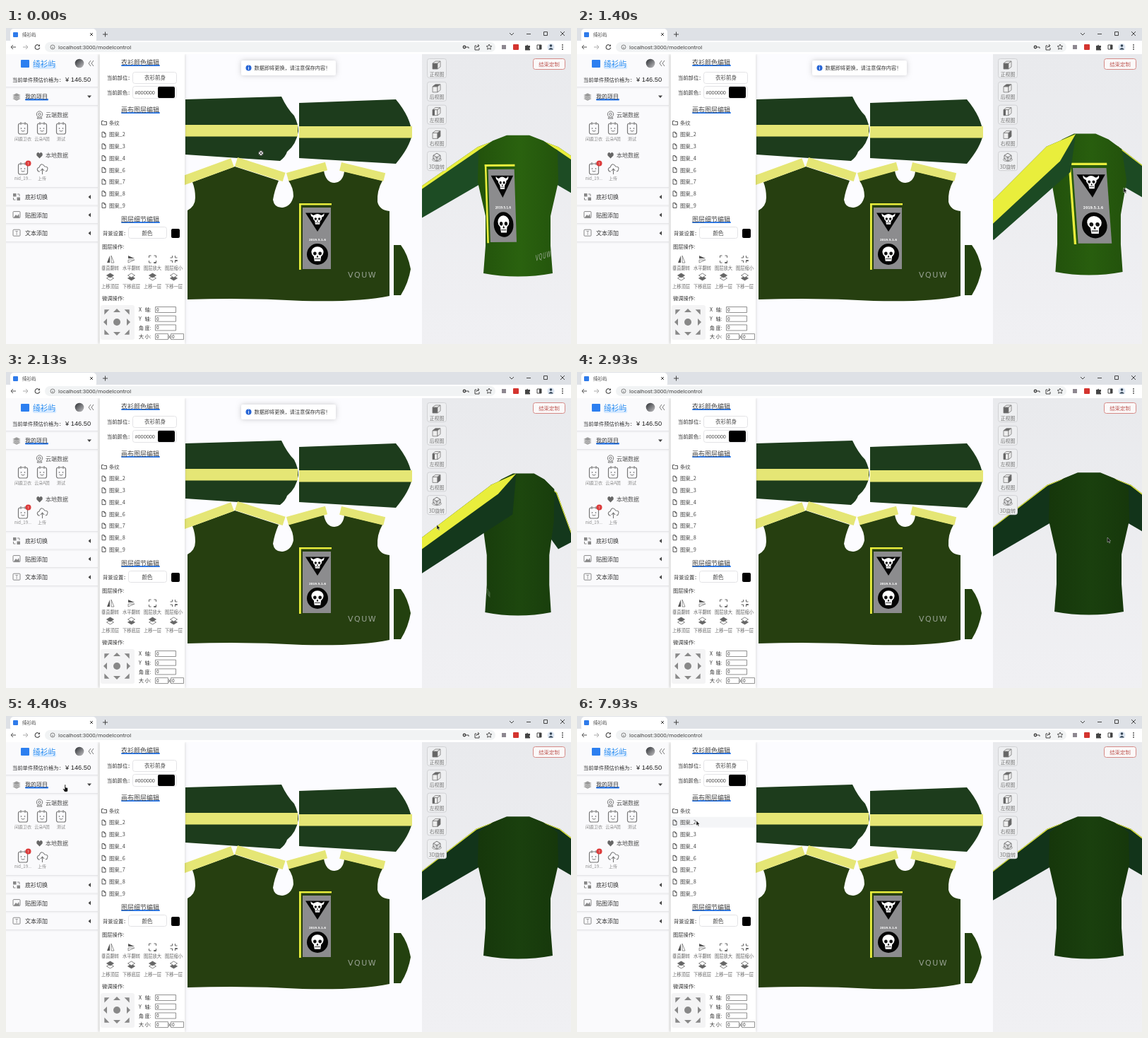
Recreate the animation shown at these times as an HTML page with a canvas. Size 800 by 447 pixels, loop 8 s.

```html
<!DOCTYPE html>
<html lang="zh">
<head>
<meta charset="utf-8">
<style>
html, body { margin: 0; width: 100%; height: 100%; overflow: hidden; }
canvas { display: block; width: 800px; height: 447px; }
</style>
</head>
<body>
<canvas id="stage"></canvas>
<script>
const canvas = document.getElementById('stage');
const dpr = window.devicePixelRatio || 1;
canvas.width = 800 * dpr;
canvas.height = 447 * dpr;
const c = canvas.getContext('2d');
const CJK = '"Noto Sans CJK SC", "Noto Sans CJK JP", sans-serif';
const WIDE = '"DejaVu Sans", sans-serif';
const YELLOW = '#e5e675', LIME = '#e9ee3c', GREY = '#777', BLUE = '#2f7bea';
const BRAND = '绮衫屿', CHEST = 'VQUW';

// Drawing helpers
function paint(fill, stroke, width = 1) {
  if (fill) { c.fillStyle = fill; c.fill(); }
  if (stroke) { c.strokeStyle = stroke; c.lineWidth = width; c.stroke(); }
}
function box(x, y, w, h, fill, stroke, r = 0, width = 1) {
  c.beginPath(); c.roundRect(x, y, w, h, r); paint(fill, stroke, width);
}
function disc(x, y, r, fill, stroke, width = 1, ry = r) {
  c.beginPath(); c.ellipse(x, y, r, ry, 0, 0, 7); paint(fill, stroke, width);
}
function poly(points, fill, stroke, width) {
  c.beginPath();
  for (const p of points) c.lineTo(...p);
  c.closePath();
  paint(fill, stroke, width);
}
function shape(d, fill, stroke, width = 1) {
  const p = new Path2D(d);
  if (fill) { c.fillStyle = fill; c.fill(p); }
  if (stroke) { c.strokeStyle = stroke; c.lineWidth = width; c.stroke(p); }
}
function text(s, x, y, size = 7.5, color = '#333', align = 'left', font = CJK, weight = 400) {
  c.font = `${weight} ${size}px ${font}`;
  c.fillStyle = color; c.textAlign = align; c.textBaseline = 'middle';
  c.fillText(s, x, y);
}
function at(x, y, draw, angle = 0) { c.save(); c.translate(x, y); c.rotate(angle); draw(); c.restore(); }
function shadowed(blur, draw) {
  c.save(); c.shadowColor = 'rgba(0,0,0,.2)'; c.shadowBlur = blur * dpr; draw(); c.restore();
}

const mix = (a, b, u) => a.map((v, i) => v + (b[i] - v) * u);
const rgb = (color, k = 1) => `rgb(${color.map(v => Math.round(v * k))})`;

// Value of [time, ...numbers] keys at time t, eased between keys
function track(keys, t) {
  const n = keys.findIndex(k => k[0] > t);
  if (n < 0) return keys.at(-1).slice(1);
  const [a, b] = [keys[n - 1], keys[n]];
  const u = (t - a[0]) / (b[0] - a[0]);
  return mix(a, b, u * u * (3 - 2 * u)).slice(1);
}

function browser() {
  box(0, 0, 800, 18, '#dee1e6');
  box(6, 1, 122, 20, '#fff', null, 5);
  box(0, 18, 800, 19, '#fff');
  box(10, 6, 7, 7, BLUE, null, 1);
  text(BRAND, 23, 9.5, 6.5, '#444');
  shape('M119 7l4 4m0-4l-4 4M137 9h7m-3.5-3.5v7M713 7l3 3 3-3M737 8.5h6M761.5 5.5h5v5h-5zM785 5l6 6m0-6l-6 6', null, '#444');
  shape('M14 27h-7l3-3m-3 3l3 3', null, '#555');
  shape('M24 27h7l-3-3m3 3l-3 3', null, '#aaa');
  c.beginPath(); c.arc(44.5, 27, 3.3, .2, 5.5); paint(null, '#555', 1.2);
  shape('M45 26h3v-3z', '#555');
  box(55, 20, 638, 14, '#f1f3f4', null, 7);
  disc(66, 27, 3, null, '#666', .8); shape('M66 26.5v2.5', null, '#666', .8);
  text('localhost:3000/modelcontrol', 74, 27.5, 8, '#444', 'left', 'Roboto, sans-serif');
  disc(649, 27, 1.7, null, '#444', 1.4);
  shape('M651 27h4v2M666 25h-2v6h6v-3M666 28q0-3 4-3m-2-2 2 2-2 2', null, '#444');
  poly(Array.from({ length: 10 }, (_, i) => {
    const r = i % 2 ? 1.9 : 4, a = i * Math.PI / 5;
    return [684 + r * Math.sin(a), 27 - r * Math.cos(a)];
  }), null, '#444', .9);
  box(702, 24, 6, 6, '#8d8790');
  box(718, 23, 8, 8, '#d4342f', null, 1);
  shape('M735 25h2q1-3 2 0h3v2.5q-2 1 0 2v2h-7z', '#444');
  box(752, 24, 6, 6, null, '#444'); box(755, 24, 3, 6, '#444');
  disc(771.5, 27, 5, '#dde6f2'); disc(771.5, 25, 1.8, '#345');
  shape('M768 30.5q3.5-5 7 0z', '#345');
  for (const y of [24, 27, 30]) disc(788, y, .9, '#444');
}

function projectIcon(x, y) {
  at(x, y, () => {
    box(-6.5, -7, 13, 15, null, GREY, 2.5, 1.2);
    shape('M-3-9v4M3-9v4M-2.5 3q2.5 2.500 5 0', null, GREY);
    disc(-2.5, 0, .8, '#555'); disc(2.5, 0, .8, '#555');
  });
}

function sidebar() {
  shadowed(4, () => box(0, 37, 130, 410, '#fafafc'));
  box(21, 45, 12, 11, '#2c7ff0', null, 1);
  box(38, 52, 33, 6, '#d5e9ff', null, 2);
  text(BRAND, 38, 51, 10.8, '#258af1', 'left', CJK, 500);
  const g = c.createLinearGradient(98, 44, 110, 56);
  g.addColorStop(0, '#2d3034'); g.addColorStop(1, '#c0bfc2');
  disc(104, 50, 6.3, g);
  shape('M120 46l-3 4 3 4m4-8l-3 4 3 4', null, GREY);
  text('当前单件预估价格为：', 9, 73.5, 7.3);
  text('¥ 146.50', 84, 73, 9.3, '#222', 'left', '"Liberation Sans", sans-serif');
  for (const y of [84, 110, 226, 251.5, 277, 303]) {
    box(0, y - 1, 130, 1, '#e5e5e8'); box(0, y, 130, 1.5, '#f2f2f4');
  }
  box(27, 100, 33, 2.6, BLUE, null, 1);
  text('我的项目', 27, 97, 8, '#333', 'left', CJK, 500);
  for (const y of [100, 97.5, 95]) shape(`M9 ${y}l6-3 6 3-6 3z`, '#999', '#fff', .5);
  shape('M115 95.5h6l-3 3.5z', '#444');
  disc(47.5, 122, 4.2, null, GREY); disc(47.5, 122, 1.7, null, GREY);
  shape('M46 125l-2 3h7l-2-3', null, GREY);
  text('云端数据', 56, 123, 8, '#555');
  ['间鹿卫衣', '云朵A团', '测试'].forEach((s, i) => {
    projectIcon(24 + i * 27, 142);
    text(s, 24 + i * 27, 156.5, 6, '#888', 'center');
  });
  shape('M47.5 184.5l-4-4q-1-4 2-4.5q1.5 0 2 1.8q.5-1.800 2-1.800q3 .5 2 4.5z', '#666');
  text('本地数据', 56, 180, 8, '#555');
  projectIcon(24, 199);
  disc(31.5, 191.5, 4, '#dc3b3b'); text('?', 31.5, 192, 5, '#fff', 'center');
  shape('M48 203h-2q-4-4 1-6q3-8 8-1q6 0 3 6l-2 1M51.500 207v-8m-2.5 3 2.5-3 2.5 3', null, GREY, 1.1);
  text('nid_19...', 24, 213, 6, '#888', 'center');
  text('上传', 51, 213, 6, '#888', 'center');
  ['底衫切换', '贴图添加', '文本添加'].forEach((s, i) => {
    const y = 239 + i * 25.6;
    text(s, 27, y, 8, '#333', 'left', CJK, 500);
    shape(`M120 ${y - 3}v6l-3.5-3z`, '#444');
    if (i) box(10, y - 5, 10, 9, null, '#888', 1);
  });
  box(10, 234, 4.5, 4.5, '#888'); box(15.5, 239.5, 4.5, 4.5, '#888');
  shape('M16 235h3v3M10.500 240v3h3', null, '#888');
  shape('M11 268l3-4 2 2 2-3 1 5z', '#888');
  text('T', 15, 290, 7, GREY, 'center');
}

function heading(s, y) {
  box(163, y + 3.4, 55, 2.2, BLUE, null, 1);
  text(s, 190, y, 9, '#444', 'center', CJK, 500);
}
const field = (x, y, w, h) => box(x, y, w, h, '#fff', '#e3e3e6', 3);

function toolIcons() {
  shape('M147 322v10h-4zM173 322v4h9z', '#555');
  shape('M149 322v10h4zM173 332v-4h9z', null, GREY, .8);
  for (let i = 0; i < 4; i++) at(207.5, 327, () => {
    shape('M2 5h3v-3M32 5v-3h3', null, '#666');
    c.translate(0, 0);
  });
  for (const sx of [-1, 1]) for (const sy of [-1, 1]) {
    shape(`M${207.5 + sx * 2} ${327 + sy * 5}h${sx * 3}v${-sy * 3}`, null, '#666');
    shape(`M${237.5 + sx * 2} ${327 + sy * 5}v${-sy * 3}h${sx * 3}`, null, '#666');
  }
  for (let i = 0; i < 4; i++) for (const d of [2, -2]) {
    shape(`M${142.5 + i * 30} ${352 + d}l5-3 5 3-5 3z`, (d > 0) === (i % 2 > 0) ? '#666' : '#fff', '#666', .8);
  }
}

function editor(mouse) {
  shadowed(4, () => box(133, 37, 120, 410, '#fff'));
  heading('衣衫颜色编辑', 48.5);
  text('当前部位：', 143, 70.5, 7.3);
  field(179.5, 62.5, 62, 16);
  text('衣衫前身', 211, 70.5, 7.5, '#444', 'center');
  text('当前颜色：', 143, 91.5, 7.3);
  field(179.5, 82.5, 62, 17);
  text('#000000', 182.5, 91.5, 7.3, '#444', 'left', '"Liberation Sans", sans-serif');
  box(215, 83, 24, 16, '#000', null, 2);
  heading('画布图层编辑', 115.5);
  ['条纹', ...[2, 3, 4, 6, 7, 8, 9].map(n => '图案_' + n)].forEach((s, i) => {
    const y = 134 + i * 16.7;
    if (mouse[0] > 134 && mouse[0] < 253 && Math.abs(mouse[1] - y) < 8) box(134, y - 8, 119, 15, '#f4f5f7');
    text(s, 146, y, 7.3, '#444');
    shape(i ? `M136 ${y - 3.5}h3l2 2v5h-5zm3 0v2h2` : `M135.5 ${y - 2.5}h2.5l1 1h3.5v4.5h-7z`, null, '#444', .9);
  });
  heading('图层细节编辑', 270.5);
  text('背景设置：', 137, 290.5, 7.3);
  field(173.5, 281.5, 54, 16);
  text('颜色', 200, 290, 7.5, '#444', 'center');
  box(234, 284, 12, 13, '#000', null, 2);
  text('图层操作:', 136, 309.5, 7.3);
  ['垂直翻转', '水平翻转', '图层放大', '图层缩小', '上移顶层', '下移底层', '上移一层', '下移一层']
    .forEach((s, i) => text(s, 147.5 + i % 4 * 30, i < 4 ? 340 : 366, 6.3, '#666', 'center'));
  toolIcons();
  text('微调操作:', 136, 382, 7.3);
  box(134, 392, 48, 49, '#f4f4f5', null, 3);
  disc(157, 416, 5, '#888');
  for (let i = 0; i < 8; i++) {
    at(157, 416, () => shape(`M-5 ${i % 2 ? -20 : -14}h10l-5-5z`, '#888'), i * Math.PI / 4);
  }
  const input = (x, y, w) => { box(x, y - 4, w, 8, '#fff', GREY, 0, .8); text('0', x + 1.5, y, 6.5); };
  ['X   轴:', 'Y   轴:', '角 度:', '大 小:'].forEach((s, i) => {
    const y = 398.5 + i * 12.7;
    text(s, 188, y, 7);
    input(211.5, y, i < 3 ? 29 : 18);
  });
  text('x', 230, 437, 6);
  input(233.5, 436.6, 18);
}

function skull(x, y, s, horns) {
  at(x, y, () => {
    c.scale(s, s);
    if (horns) shape('M-5-2Q-14-4-12-10Q-9-5-4-7L4-7Q9-5 12-10Q14-4 5-2z', '#fff');
    disc(0, -2, 8, '#fff', null, 1, 7);
    shape('M-5 2h10l-1 8h-8z', '#fff');
    disc(-3.4, 0, 2.2, '#111'); disc(3.4, 0, 2.2, '#111');
    shape('M0 2l-1.4 3h2.800z', '#111');
    shape('M-3.5 7h7', null, '#111', .8);
  });
}

// Chest print, 46 by 94, from its top left corner
function emblem() {
  box(0, 0, 46, 2.6, LIME); box(0, 0, 2.8, 94, LIME);
  box(5, 6, 40, 87, '#8c8c8e');
  shape('M9 13.5h34l-17 26.500z', '#050505');
  skull(26, 22, .78, true);
  text('2019.5.1.6', 26, 52, 4, '#fff', 'center', WIDE, 700);
  disc(26, 72, 15, '#050505');
  skull(26, 71, 1.08);
}

function chestName(color) {
  c.letterSpacing = '1.5px';
  text(CHEST, 0, 0, 11, color, 'left', WIDE);
  c.letterSpacing = '0px';
}

function pattern() {
  box(254, 37, 335, 410, '#fcfcff');
  const strip = (x, y, w, h, slope = 0) => at(x, y, () => box(0, 0, w, h, YELLOW), slope);
  shape('M254 101L390 97Q398 114 408 124Q414 136 414 146Q411 165 398 175Q396 182 388 188L254 179z', '#1d3c1c');
  shape('M415 106L552 101Q573 126 575 150Q572 168 552 192L415 184z', '#1d3c1c');
  strip(254, 137, 159, 16.5); strip(415, 139, 160, 16.5);
  shape('M257 384V258Q268 252 268 240Q268 228 264 218L324 196L386 216Q380 230 378 243Q380 255 392 254Q404 252 407 238Q407 226 400 216L450 202Q453 219 465 219Q477 218 479 203L533 216Q525 230 526 246Q529 258 543 259V379Q500 388 420 386Q340 381 257 384z', '#263f10');
  strip(248, 210, 75, 13, -.35); strip(328, 183, 71, 13, .31);
  strip(397, 205, 57, 12, -.27); strip(475, 190, 64, 12, .24);
  shape('M549 307H559Q569 320 573 341Q570 360 559 378H549z', '#23410f');
  at(415, 248, emblem);
  at(484, 350, () => chestName('#98a293'));
}

// Shirt model: x to the side, y down, z to the wearer's front.
// Torso rings: height, half width, half depth
const TORSO = [[143, 16, 14], [151, 36, 26], [165, 56, 38], [210, 57, 46], [258, 46, 43], [300, 46, 43], [339, 49, 45]];
const CAMERA = 600, AXIS = 725, EYE = 245, LEAN = -10;

function project(x, y, z, { cos, sin, lift }) {
  const depth = z * cos - x * sin, scale = CAMERA / (CAMERA - depth);
  return { x: AXIS + (x * cos + z * sin) * scale, y: EYE + (y - EYE) * scale + depth * .1 + lift, depth, scale };
}

function sleeve(side, view, cloth) {
  const neck = project(side * 16, 144, LEAN, view);
  const shoulder = project(side * 45, 180, LEAN, view);
  const cuff = project(side * 170, 262, 30, view);
  const dx = cuff.x - shoulder.x, dy = cuff.y - shoulder.y, len = Math.hypot(dx, dy), up = dx > 0 ? 1 : -1;
  const facing = (cuff.depth - shoulder.depth) / 155;
  // A point across the tube: 1 is its upper edge, -1 its lower edge
  const across = (p, r, k) => [p.x + up * dy / len * r * k * p.scale, p.y - up * dx / len * r * k * p.scale];
  const top = [[neck.x, neck.y], across(shoulder, 24, 1), across(cuff, 16, 1)];
  const edge = 1 - 2 * (.03 + 1.1 * Math.max(0, facing - .2));
  return {
    front: facing > .3,
    draw() {
      poly([...top, across(cuff, 16, -1), across(shoulder, 24, -1)], cloth);
      poly([...top, across(cuff, 16, edge), across(shoulder, 24, edge)], LIME);
    },
  };
}

function torsoPath(view) {
  const ring = ([y, a, b]) => {
    const lean = LEAN * Math.max(0, (210 - y) / 67), p = project(0, y, lean, view);
    return [p.x, p.y, Math.hypot(a * view.cos, b * view.sin)];
  };
  const rings = TORSO.map(ring), hem = rings.at(-1);
  c.beginPath();
  for (const [x, y, w] of rings) c.lineTo(x + w, y);
  c.quadraticCurveTo(hem[0], hem[1] + 9, hem[0] - hem[2], hem[1]);
  for (const [x, y, w] of rings.reverse()) c.lineTo(x - w, y);
  c.closePath();
}

// Lays a flat print w by h on the torso between two angles, in degrees from the front
function wrap(from, to, skew, top, bottom, w, h, view, draw) {
  const on = (deg, y) => {
    const a = deg * Math.PI / 180;
    return project(49 * Math.sin(a), y, 45 * Math.cos(a), view);
  };
  const p = on(from, top), q = on(to, top), r = on(from + skew, bottom);
  if (q.x <= p.x) return;
  c.save();
  c.transform((q.x - p.x) / w, (q.y - p.y) / w, (r.x - p.x) / h, (r.y - p.y) / h, p.x, p.y);
  draw();
  c.restore();
}

function shirt(degrees, lift) {
  const a = degrees * Math.PI / 180;
  const view = { cos: Math.cos(a), sin: Math.sin(a), lift };
  const light = .5 + .5 * view.cos;
  const cloth = mix([25, 62, 13], [40, 94, 14], light);
  const sleeves = [-1, 1].map(side => sleeve(side, view, rgb(mix([18, 52, 26], [29, 76, 36], light))));
  sleeves.filter(s => !s.front).forEach(s => s.draw());
  const g = c.createLinearGradient(670, 0, 785, 0);
  [.88, 1.04, .88].forEach((k, i) => g.addColorStop(i / 2, rgb(cloth, k)));
  c.save();
  torsoPath(view);
  paint(g); c.clip();
  wrap(-70, -5, 11, 185, 292, 46, 94, view, emblem);
  wrap(28, 80, 0, 310, 320, 44, 10, view, () => chestName('#9dac97'));
  c.restore();
  sleeves.filter(s => s.front).forEach(s => s.draw());
}

function cube(x, y, side) {
  const tone = n => n === side ? '#666' : '#eee';
  shape(`M${x - 5} ${y - 3}h7v8h-7z`, tone(0), GREY, .8);
  shape(`M${x - 5} ${y - 3}l4-3h7l-4 3z`, tone(1), GREY, .8);
  shape(`M${x + 2} ${y - 3}l4-3v8l-4 3z`, tone(3), GREY, .8);
  if (side === 2) box(x - 5, y - 3, 3, 8, '#666');
}

function viewer(t) {
  const g = c.createLinearGradient(0, 37, 0, 447);
  g.addColorStop(0, '#e9eaed'); g.addColorStop(1, '#f0f0f3');
  c.save();
  c.beginPath(); c.rect(589, 37, 211, 410); c.clip();
  box(589, 37, 211, 410, g);
  shirt(...track(TURN, t));
  c.restore();
  ['正视图', '后视图', '左视图', '右视图', '3D旋转'].forEach((s, i) => {
    const y = 57 + i * 32.8;
    box(596.5, y - 13.5, 27, 27, '#eeeff1', '#d0d1d4', 3);
    if (i < 4) cube(609, y - 4, i);
    else {
      shape(`M610 ${y - 11}l5 3v5l-5 3-5-3v-5zm-5 3l5 2.5 5-2.5m-5 2.5v5.5`, null, GREY);
      disc(610, y - 2, 6.5, null, '#888', .8, 2.5);
    }
    text(s, 610, y + 8, 6.9, GREY, 'center');
  });
  box(746.5, 43.5, 45, 15, '#fbf9f9', '#d58a87', 3);
  text('结束定制', 769, 51.5, 7.4, '#bf5a56', 'center');
}

function toast(t) {
  const gone = Math.min(1, Math.max(0, (t - 2350) / 250));
  if (gone === 1) return;
  at(0, -20 * gone, () => {
    c.globalAlpha = 1 - gone;
    shadowed(7, () => box(333, 46, 134, 21, '#fff', null, 2));
    disc(343.5, 56.5, 4, '#2765d5');
    text('i', 343.5, 56.5, 6, '#fff', 'center', CJK, 700);
    text('数据即将更换，请注意保存内容！', 351.5, 56.5, 7.2);
  });
}

function pointer([x, y]) {
  at(x, y, () => {
    if (x > 254 && x < 588) {
      disc(0, 0, 3.2, '#fff', '#555', .8);
      shape('M-3-3l6 6m0-6l-6 6', null, '#444');
    } else if (x < 130) {
      shape('M-1-5h1.5v4l3 .8v4l-1 1.5h-3.5l-2.5-4 1-.5 1.5 1z', '#111', '#fff', .5);
    } else {
      shape('M0-3v7l1.6-1.4 1.2 2.4 1-.5-1.100-2.3 1.9-.2z', '#111', '#fff', .4);
    }
  });
}

// Time, heading in degrees, vertical offset
const TURN = [[0, 0, 8], [800, 0, 8], [1380, 37, 6], [1440, 37, 6], [2150, -130, 1], [2350, -130, 1], [2930, -180, 0]];
const MOUSE = [[0, 361, 177], [700, 732, 226], [1400, 774, 229], [1440, 774, 229], [2130, 610, 219],
  [2480, 793, 238], [2930, 751, 237], [3470, 751, 237], [4300, 84, 102], [7370, 84, 102], [7930, 169, 151]];

function draw(now) {
  const t = now % 8000, mouse = track(MOUSE, t);
  c.setTransform(dpr, 0, 0, dpr, 0, 0);
  box(0, 0, 800, 447, '#fff');
  pattern();
  viewer(t);
  sidebar();
  editor(mouse);
  browser();
  toast(t);
  pointer(mouse);
  requestAnimationFrame(draw);
}
requestAnimationFrame(draw);
</script>
</body>
</html>
```
